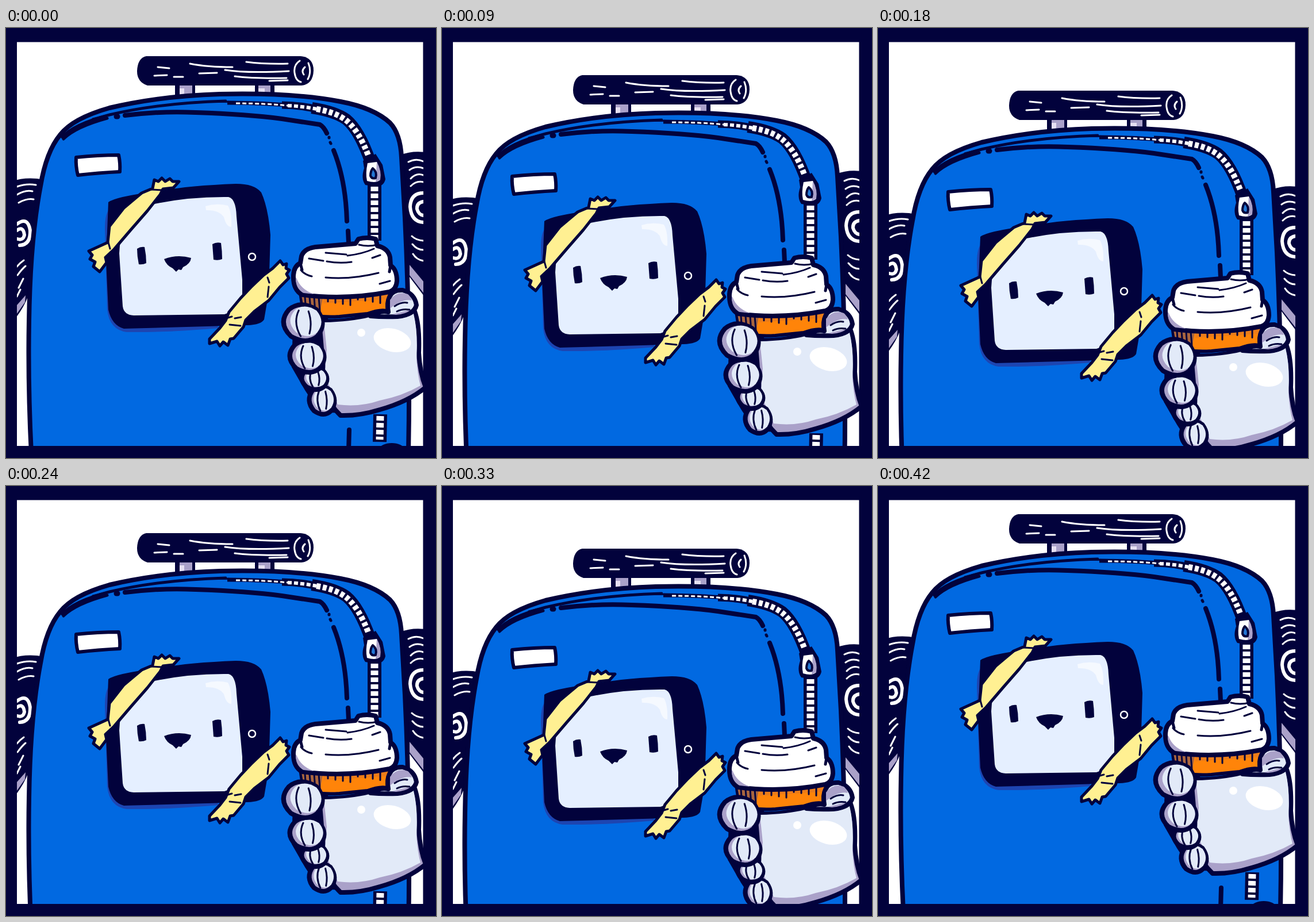
An HTML page for the animation above (450 ms loop, 748 px wide and 748 px high).

```html
<!DOCTYPE html>
<html lang="en">
<head>
<meta charset="utf-8">
<title>Bouncing backpack</title>
<style>
  html, body { margin: 0; width: 100%; height: 100%; overflow: hidden; background: #02023c; }
  svg { display: block; width: 100vw; height: 100vh; }
  .ink { fill: none; stroke: #02023c; stroke-linecap: round; stroke-linejoin: round; stroke-width: 8; }
  .thin { stroke-width: 3; }
  .mid { stroke-width: 5; }
  .wide { stroke-width: 9; }
  .navy { fill: #02023c; }
  .white { fill: #fff; }
  .pale { fill: #e5efff; }
  .glove { fill: #e2eaf8; }
  .mauve { fill: #aaa1c9; }
  .orange { fill: #ff8409; }
  .tape { fill: #fff092; }
  .chalk { fill: none; stroke: #fff; stroke-width: 3; stroke-linecap: round; }
  .ring { stroke-width: 6; }
</style>
</head>
<body>
<svg viewBox="0 0 748 748">
  <defs>
    <clipPath id="window"><path d="M19 24.5H725.5V727H19Z"/></clipPath>
    <linearGradient id="side">
      <stop offset="0" stop-color="#0566da"/>
      <stop offset=".6" stop-color="#0f69d4"/>
      <stop offset=".85" stop-color="#1c70d0"/>
      <stop offset="1" stop-color="#176dd2"/>
    </linearGradient>
  </defs>
  <path class="navy" d="M0 0H748V748H0Z"/>
  <g clip-path="url(#window)">
    <path class="white" d="M19 24H726V727H19Z"/>
    <g id="bag">

      <!-- arms -->
      <path class="navy" d="M10 267Q35 258 66 264L44 440Q42 475 10 513Z"/>
      <path class="chalk" d="M19 276Q36 270 52 273M19 290Q34 281 46 284M22 304Q36 296 48 298M19 415Q25 408 31 404M20 430Q27 420 34 414M22 452L30 436M19 467L25 455"/>
      <path class="chalk ring" d="M19 341Q38 327 42 352Q43 377 24 378M19 352Q30 344 32 360Q30 370 20 367"/>
      <path class="mauve" d="M19 482L34 465L33 477L19 497Z"/>
      <path class="navy" d="M686 221Q708 212 736 217V478L696 425Z"/>
      <path class="chalk" d="M700 233Q713 226 726 232M702 247Q713 239 726 244M704 262Q714 251 726 256M704 275Q714 265 726 268M706 362Q713 369 726 370M707 376Q715 386 726 386M708 393Q714 403 726 405"/>
      <path class="chalk ring" d="M726 287Q704 287 703 311Q705 337 726 338M726 302Q714 304 715 315Q718 325 726 326"/>
      <path class="mauve" d="M702 412L727 442V462L702 430Z"/>

      <!-- handle -->
      <path class="navy" d="M294 96H329V122H294ZM433 96H467V122H433Z"/>
      <path class="mauve" d="M302 100H324V118H302ZM439 100H460V116H439Z"/>
      <path fill="#e6e0f2" d="M302 105H310V118H302ZM439 105H450V116H439Z"/>
      <path class="navy" d="M244 49L512 49Q535 51 535 74Q534 98 514 100L246 100Q228 94 228 75Q229 52 244 49Z"/>
      <path class="chalk" d="M264 68L284 70M320 62Q350 68 394 68M418 59Q450 63 490 62M381 73Q420 79 492 75M258 83L280 82M292 85L308 85M336 79L367 78M398 84Q430 88 488 87M458 92L490 91"/>
      <path class="chalk" d="M511 57Q500 64 502 78Q504 92 513 94M520 68Q513 74 518 81M526 61Q532 76 525 89"/>

      <!-- bag body -->
      <path id="shell" fill="#0169e1" d="M44 740Q38 620 40 510Q42 370 60 275Q70 215 94 186Q116 157 180 139Q270 118 372 115Q500 112 582 128Q640 139 668 165Q686 184 688 225L694 330Q704 540 700 740Z"/>
      <path fill="url(#side)" d="M110 178Q200 118 372 115Q500 112 582 128Q640 139 668 165Q686 184 688 225L694 330Q702 470 701 560L597 560L593 336Q588 265 566 205L550 168Q460 151 330 147Q190 145 110 178Z"/>
      <path fill="#2d5fb8" opacity=".7" d="M48 682Q53 706 62 728H49Z"/>
      <use href="#shell" class="ink" style="fill:none"/>
      <g class="ink mid">
        <path d="M98 190Q116 168 180 151Q270 130 382 127"/>
        <path class="thin" d="M151 158Q220 139 318 130Q358 126 420 130"/>
        <path d="M100 193Q121 172 176 157"/>
        <path class="ink" d="M207 152Q270 144 330 147Q420 150 480 158L546 168Q553 172 558 183"/>
        <path class="wide" d="M192 154L194 154"/>
        <path d="M562 190L562 191M564 199L565 201"/>
        <path class="ink" d="M570 213Q591 265 593 336M595 353L596 374M597 699L596 735"/>
      </g>

      <!-- zip -->
      <g fill="none">
        <path stroke="#02023c" stroke-width="7" d="M385 130Q450 130 510 136"/>
        <path stroke="#02023c" stroke-width="13" d="M480 134Q510 134 540 141"/>
        <path stroke="#02023c" stroke-width="20" d="M532 139Q572 145 592 159Q615 178 634 233"/>
        <path stroke="#fff" stroke-width="3" stroke-dasharray="7 4" d="M400 131Q450 131 490 135"/>
        <path stroke="#fff" stroke-width="6" stroke-dasharray="7 4" d="M490 135Q515 136 540 141"/>
        <path stroke="#fff" stroke-width="10" stroke-dasharray="7 4" d="M540 141Q572 146 591 160Q614 178 631 224"/>
        <path stroke="#02023c" stroke-width="24" d="M641 270V370M651 672L650 720"/>
        <path stroke="#fff" stroke-width="13" stroke-dasharray="8 4" d="M641 276V370M651 675L650 716"/>
      </g>
      <path class="navy" d="M621 231L643 219L655 238L660 263Q657 276 643 276L625 273Q617 262 623 244Z"/>
      <path class="white" d="M629 235L645 233Q652 246 651 264Q644 271 628 266Q625 253 629 235Z"/>
      <path class="mauve" d="M645 233Q654 249 651 264L643 268Z"/>
      <path class="ink" style="fill:#2477d4;stroke-width:4" d="M638 244Q646 250 643 261Q636 263 634 257Q634 249 638 244Z"/>
      <ellipse class="navy" cx="671" cy="732" rx="21" ry="10"/>

      <!-- label -->
      <path class="ink" style="fill:#fff;stroke-width:6" d="M122 225Q160 221 196 221Q199 235 198 250Q160 252 125 256Q121 240 122 225Z"/>

      <!-- screen -->
      <path fill="#1d45b1" d="M181 315Q172 320 172 350L176 490Q180 525 210 529Q280 530 370 522L360 505L190 500Z"/>
      <path class="navy" d="M178 303Q190 293 270 283Q320 274 400 271Q432 271 444 286Q456 312 460 360L457 460L449 507Q444 516 420 517L205 523Q184 517 178 490L174 405Z"/>
      <path class="pale" d="M226 314Q300 293 387 294Q400 297 401 328L411 438V475Q408 489 380 498L222 500Q205 499 203 484L197 392Q199 340 226 314Z"/>
      <path fill="#f5f9ff" d="M347 310Q366 304 386 309Q393 321 392 346Q383 346 379 329Q370 316 348 317Z"/>
      <g class="navy">
        <path d="M228 384Q234 380 241 381Q244 395 244 409Q238 412 231 411Q228 397 228 384Z"/>
        <path d="M359 376Q366 372 374 374Q376 388 376 402Q369 405 361 403Z"/>
        <path d="M275 402Q298 393 322 400Q321 410 308 416L305 421L300 420L296 424L290 418Q279 413 275 402Z"/>
      </g>
      <circle cx="428" cy="398" r="6" fill="#02023c" stroke="#fff" stroke-width="2.5"/>

      <!-- tape -->
      <g class="ink mid">
        <path class="tape" d="M255 279L236 287L205 313L180 345L177 373L144 388L150 395L146 402L155 407L152 415L163 424L175 408L173 399L188 385L218 350L246 318L268 290L273 280L291 278L301 267L290 267L285 262L277 267L271 261L265 267L258 264Z"/>
        <path class="thin" d="M251 281L272 282M178 373L181 384"/>
        <path class="tape" d="M448 430L464 418L477 405L482 412L488 410L487 418L493 421L488 428L492 435L476 451L457 474L432 493L417 508L413 520L396 540L390 541L386 552L378 546L372 553L367 545L354 549L354 541L372 522L382 509L388 494L408 470L426 451Z"/>
        <path class="thin" d="M455 434L458 443M457 450L455 468M386 504L393 502M398 505L409 503M389 516L408 518"/>
      </g>

      <!-- hand -->
      <path class="navy" d="M500 484L560 505L585 670L545 668L520 630L497 590Z"/>
      <path class="ink mauve" d="M545 510Q595 512 630 500Q660 507 711 493Q720 518 718 565Q720 600 730 625Q700 650 650 664Q615 675 582 674Q562 655 555 630Z"/>
      <path class="glove" d="M553 512Q600 511 632 503Q670 506 709 497Q717 530 714 575Q716 605 721 622Q690 640 650 648Q615 660 577 655Q570 635 560 618L555 595L558 560Z"/>
      <ellipse class="white" cx="672" cy="543" rx="33" ry="20" transform="rotate(14 672 543)"/>
      <circle class="white" cx="618" cy="530" r="7"/>

      <!-- cup -->
      <path class="ink orange" style="stroke-width:6" d="M512 460L517 493Q540 505 580 502L629 497Q650 489 663 492L669 458Z"/>
      <path fill="#a9653f" d="M514 465H552L545 501Q526 499 519 493Z"/>
      <path fill="#d9772b" d="M552 469L666 462L662 472L552 479Z" opacity=".5"/>
      <path class="ink thin" id="hatch"/>
      <path class="ink glove" d="M665 494Q662 478 667 468Q672 455 690 456Q711 462 714 482Q710 499 681 502Q655 503 634 501Q650 491 665 494Z"/>
      <path class="mauve" d="M668 473Q681 456 699 463Q704 467 706 474Q690 470 668 488ZM672 498L704 490Q696 498 678 499Z"/>
      <path class="ink thin" d="M676 484Q688 476 698 478M680 493Q690 488 702 490"/>
      <path class="ink white" d="M514 397Q518 384 538 381L608 375L613 367Q628 363 643 367L646 379Q665 383 668 399L669 413Q680 420 680 440Q679 455 667 459Q590 474 515 464Q499 455 500 430Q501 414 512 409Z"/>
      <path class="mauve" d="M505 434Q512 455 536 463L518 461Q504 454 504 436Z"/>
      <path class="ink thin" d="M527 401L552 405M558 406Q580 410 601 407M556 391L592 394M614 377Q630 381 646 377M594 396Q620 393 640 384M637 400L651 395M513 421Q519 429 532 432M556 434Q600 438 648 426M650 445L668 440"/>
      <path class="ink mid" d="M512 409L515 421M669 413L667 424"/>

      <g id="fingers"></g>
    </g>
  </g>
</svg>
<script>
  const NS = 'http://www.w3.org/2000/svg';
  const byId = id => document.getElementById(id);

  function add(d, cls) {
    const p = document.createElementNS(NS, 'path');
    p.setAttribute('d', d);
    p.setAttribute('class', cls);
    byId('fingers').append(p);
  }

  // Rounded blob: centre, half width, half height
  const blob = (x, y, w, h) =>
    `M${x - w * .7} ${y - h * .75}Q${x - w * .1} ${y - h * 1.3} ${x + w * .7} ${y - h * .75}` +
    `Q${x + w * 1.3} ${y} ${x + w * .75} ${y + h * .75}` +
    `Q${x + w * .2} ${y + h * 1.25} ${x - w * .6} ${y + h * .75}` +
    `Q${x - w * 1.3} ${y} ${x - w * .7} ${y - h * .75}Z`;

  function finger(x, y, w, h) {
    add(blob(x, y, w, h), 'ink mauve');
    add(blob(x + w * .15, y - h * .08, w * .8, h * .82), 'glove');
    add(`M${x - w * .2} ${y - h * .7}Q${x - w * .5} ${y} ${x - w * .1} ${y + h * .75}` +
        `M${x + w * .3} ${y - h * .65}Q${x + w * .5} ${y} ${x + w * .35} ${y + h * .6}`, 'ink thin');
  }
  finger(549, 648, 22, 24);
  finger(536, 610, 22, 19);
  finger(523, 572, 30, 27);
  finger(516, 513, 34, 31);

  // Cup shading: long strokes on the left, short ones along the rim
  let hatch = '';
  for (let x = 520; x < 550; x += 8) hatch += `M${x} 468L${x + 2} ${490 + x % 3 * 3}`;
  for (let x = 560; x < 664; x += 13) hatch += `M${x} ${471 - (x - 557) * .07}v${5 + x % 4 * 3}`;
  byId('hatch').setAttribute('d', hatch);

  const drops = [0, 60, 47, 33, 0];
  const step = 30;
  const frames = [...drops, 0].map((y, i) => ({
    transform: `translateY(${y}px)`, offset: i / drops.length, easing: 'step-end'
  }));
  byId('bag').animate(frames, { duration: step * drops.length, iterations: Infinity });
</script>
</body>
</html>
```
